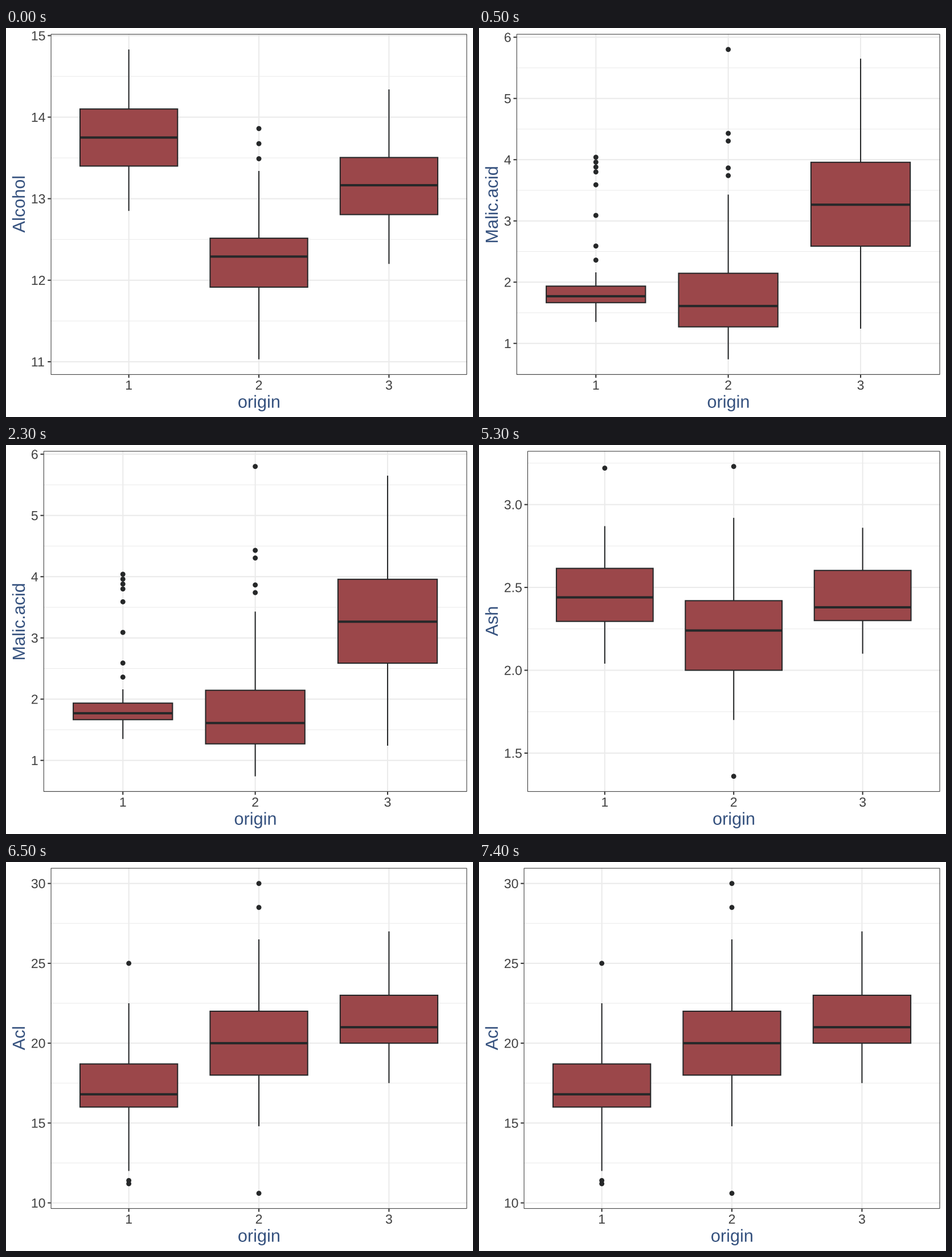
Write a matplotlib script that moves like this. It is 820 by 683 pixels and loops after 8000 ms.

```python
import math
import numpy as np
import matplotlib.pyplot as plt
from matplotlib.animation import FuncAnimation
from matplotlib.patches import Circle, PathPatch, Rectangle
from matplotlib.textpath import TextPath
from matplotlib.transforms import Affine2D

W, H, DPI = 820, 683, 64
PX = 72 / DPI                      # points per pixel
TOP, BOTTOM, RIGHT = 10.5, 608.9, 809.5
STEP_MS, LOOP_MS, HOLD_MS, LEAD_MS = 500, 8000, 3000, 2500

INK, FILL = "#262829", "#9B474A"
GRID, AXIS = "#EBEBEB", "#333333"
TICK_TEXT, TITLE_TEXT = "#404040", "#36527F"

# Everything is sized from one theme point
PT = 1.917
TICK_SIZE, TITLE_SIZE = 12 * PT, 16 * PT
LINE = 1.067 * PT
TICK_LEN = 2.75 * PT
DOT = 2.31 * PT


def run(first, last, count):
    return tuple(np.linspace(first, last, count))


# Per box: low whisker, quartiles, high whisker, then any outliers
PANELS = {
    "Alcohol": [
        (12.85, 13.4, 13.75, 14.1, 14.83),
        (11.03, 11.915, 12.29, 12.515, 13.34, *run(13.49, 13.86, 3)),
        (12.2, 12.805, 13.165, 13.505, 14.34),
    ],
    "Malic.acid": [
        (1.35, 1.665, 1.77, 1.935, 2.16,
         2.36, *run(2.59, 3.59, 3), *run(3.8, 4.04, 4)),
        (0.74, 1.27, 1.61, 2.145, 3.43, 3.74, 3.865, 4.305, 4.43, 5.8),
        (1.24, 2.5875, 3.265, 3.9575, 5.65),
    ],
    "Ash": [
        (2.04, 2.295, 2.44, 2.615, 2.87, 3.22),
        (1.7, 2, 2.24, 2.42, 2.92, 1.36, 3.23),
        (2.1, 2.3, 2.38, 2.6025, 2.86),
    ],
    "Acl": [
        (12, 16, 16.8, 18.7, 22.5, 11.2, 11.4, 25),
        (14.8, 18, 20, 22, 26.5, 10.6, 28.5, 30),
        (17.5, 20, 21, 23, 27),
    ],
}

fig = plt.figure(figsize=(W / DPI, H / DPI), dpi=DPI, facecolor="white")
ax = fig.add_axes([0, 0, 1, 1])


def line(xs, ys, color, width=LINE, z=1):
    ax.plot(xs, ys, color=color, lw=width * PX, solid_capstyle="butt",
            snap=False, zorder=z)


def rect(x0, y0, x1, y1, fill, edge, width, z):
    ax.add_patch(Rectangle((x0, y0), x1 - x0, y1 - y0, fc=fill, ec=edge,
                           lw=width * PX, snap=False, zorder=z))


def glyphs(text, size):
    return TextPath((0, 0), text, size=size, prop={"family": "Liberation Sans"})


def put_text(path, x, y, color, angle=0):
    place = Affine2D().rotate_deg(angle).scale(1, -1).translate(x, y)
    ax.add_patch(PathPatch(place.transform_path(path), fc=color, lw=0, zorder=6))


def number_width(text):
    return TICK_SIZE * sum(0.278 if c == "." else 0.556 for c in text)


def number(text, x, y, align):
    """Place digits by their advance width; align 1 is right, 0.5 is centre."""
    put_text(glyphs(text, TICK_SIZE), x - align * number_width(text), y, TICK_TEXT)


def title(text, x, y, angle=0):
    path = glyphs(text, TITLE_SIZE)
    box = path.get_extents()
    path = Affine2D().translate(-(box.x0 + box.x1) / 2, 0).transform_path(path)
    put_text(path, x, y, TITLE_TEXT, angle)


def nice_step(span):
    """Largest 1, 2 or 5 times a power of ten that fits four times in span."""
    unit = 10 ** math.floor(math.log10(span / 4))
    return max(m * unit for m in (1, 2, 5) if m * unit <= span / 4)


def multiples(step, lo, hi):
    return step * np.arange(math.ceil(lo / step), math.floor(hi / step) + 1)


def draw_panel(name, boxes):
    values = np.concatenate(boxes)
    pad = 0.05 * np.ptp(values)
    lo, hi = values.min() - pad, values.max() + pad
    step = nice_step(hi - lo)
    majors = multiples(step, lo, hi)
    labels = [f"{v:.{0 if step >= 1 else 1}f}" for v in majors]
    left = 53 + max(map(number_width, labels))
    unit = (RIGHT - left) / 3.2

    def to_y(v):
        return BOTTOM - (v - lo) / (hi - lo) * (BOTTOM - TOP)

    # The finer grid lies under the main one
    for y in to_y(multiples(step / 2, lo, hi)):
        line([left, RIGHT], [y, y], GRID, LINE / 2)
    for y, label in zip(to_y(majors), labels):
        line([left, RIGHT], [y, y], GRID)
        line([left - TICK_LEN, left], [y, y], AXIS, z=5)
        number(label, left - TICK_LEN - 2 * PT, y + 8.2, 1)

    for k, (*stats, ) in enumerate(boxes, 1):
        x, half = left + (k - 0.4) * unit, 0.375 * unit
        low, q1, mid, q3, high, *outliers = map(to_y, stats)
        line([x, x], [TOP, BOTTOM], GRID)
        line([x, x], [BOTTOM, BOTTOM + TICK_LEN], AXIS, z=5)
        number(str(k), x, BOTTOM + 26, 0.5)
        line([x, x], [low, q1], INK, z=2)
        line([x, x], [q3, high], INK, z=2)
        rect(x - half, q3, x + half, q1, FILL, INK, LINE, 3)
        line([x - half, x + half], [mid, mid], INK, 2 * LINE, 4)
        for y in outliers:
            ax.add_patch(Circle((x, y), DOT, fc=INK, lw=0, zorder=4))

    inset = LINE / 4
    rect(left + inset, TOP + inset, RIGHT - inset, BOTTOM - inset,
         "none", AXIS, LINE / 2, 5)
    title("origin", (left + RIGHT) / 2, 666.7)
    title(name, 33, (TOP + BOTTOM) / 2 + 0.4, 90)


def update(i):
    ax.clear()
    ax.axis("off")
    ax.set_xlim(0, W)
    ax.set_ylim(H, 0)
    ax.set_autoscale_on(False)
    # The loop starts late in the first panel's hold
    shown = (i * STEP_MS + LEAD_MS) // HOLD_MS
    draw_panel(*list(PANELS.items())[shown])
    return ax.get_children()


anim = FuncAnimation(fig, update, frames=LOOP_MS // STEP_MS, interval=STEP_MS,
                     repeat=True, repeat_delay=0, blit=False)
plt.show()
```
